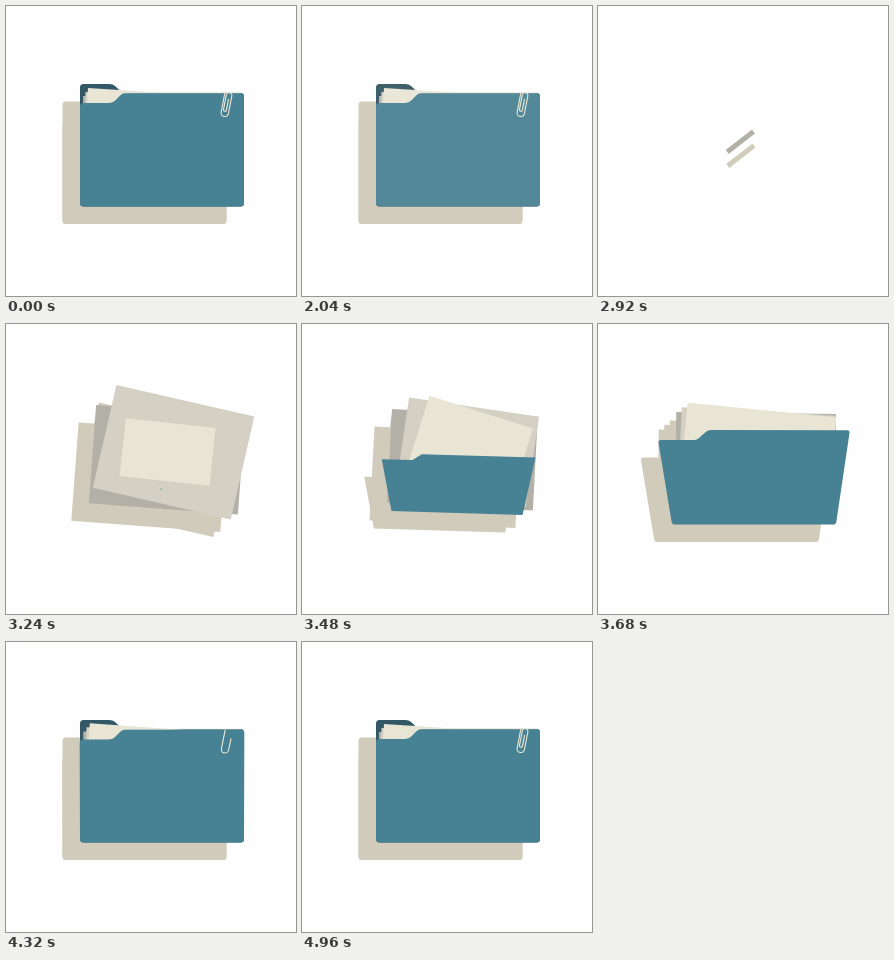
Animation of 290x290 px, one loop 5 s. Source, as an HTML page:

```html
<!DOCTYPE html>
<html lang="en">
<head>
<meta charset="utf-8">
<title>Folder</title>
<style>
  html, body { margin: 0; width: 100%; height: 100%; overflow: hidden; background: #fefefe; }
  svg { display: block; width: 100vw; height: 100vh; }
</style>
</head>
<body>
<svg viewBox="0 0 290 290">
  <g id="scene">
    <g id="shadows"></g>
    <g id="shapes"></g>
    <path id="edge" fill="none" stroke-width="0.9"/>
    <path id="clip" fill="none" stroke-width="1.15" stroke-linecap="round" pathLength="100"
      d="M-3.7 -10V9a3.7 3.7 0 0 0 7.4 0V-9a2.8 2.8 0 0 0 -5.6 0V6a1.5 1.5 0 0 0 3 0V-5"/>
  </g>
</svg>
<script>
const LOOP = 5000, STEP = 40;
const FADE = 1990, REBUILD = 2740, SPREAD = 3480, OPEN = 3720, CLOSE = 3960, SHUT = 4400;
const TEAL = [71, 129, 148], DARK = [50, 88, 101], CREAM = [232, 229, 212];
const MID = [212, 208, 196], GREY = [178, 176, 167], BEIGE = [208, 203, 186];
const PALE = [226, 228, 212], WHITE = [254, 254, 254];
const CENTER = 156, BASE = 200.6, HALF = 82, HEIGHT = 113.6;

const clamp = v => Math.max(0, Math.min(1, v));
const span = (t, a, b) => clamp((t - a) / (b - a));
const lerp = (a, b, k) => a + (b - a) * k;
const mix = (a, b, k) => a.map((v, i) => lerp(v, b[i], k));
const rgb = c => `rgb(${c.map(Math.round)})`;
const easeOut = k => 1 - (1 - k) ** 3;
const easeInOut = k => k < 0.5 ? 4 * k ** 3 : 1 - 4 * (1 - k) ** 3;

const place = (x, y, angle) => {
  const a = angle * Math.PI / 180, c = Math.cos(a), s = Math.sin(a);
  return ([u, v]) => [x + u * c - v * s, y + u * s + v * c];
};

function outline(points, radius) {
  const n = points.length;
  const toward = (p, q) => {
    const d = Math.hypot(q[0] - p[0], q[1] - p[1]) || 1;
    return mix(p, q, Math.min(radius / d, 0.5));
  };
  return points.map((p, i) =>
    `${i ? 'L' : 'M'}${toward(p, points[(i + n - 1) % n])}Q${p} ${toward(p, points[(i + 1) % n])}`
  ).join('') + 'Z';
}

// Pose of a sheet, given by its top left corner: [centre x, centre y, angle, width, height].
const pose = (x, y, angle, w, h) => [...place(x, y, angle)([w / 2, h / 2]), angle, w, h];
const fanned = i => pose(90 + 16 * i + i * i, 85 - 17 * i + 6 * i * i,
  3 + 4 * i + 1.25 * i * i, 146 - 10 * i - 5 * i * i, 94 - 3.5 * i * i);
const stacked = i => pose(78 + 5.5 * i, 88 - 4.5 * i, 0.7 + 2.3 * i, 160 - 5 * i, 100 - 2 * i);
const filed = i => pose(77 + 2.5 * i, 90 - 4 * i, 1.85 * i, 158 - 3 * i, 100);

// Sheets swing out of a thin strip, one after another, with a small overshoot.
const sheetStart = i => 2800 + 120 * i;
const growth = age => 1.08 * easeInOut(span(age, 0, 320)) - 0.08 * easeOut(span(age, 320, 680));

function sheet(i) {
  return t => {
    const size = growth(t - sheetStart(i));
    const spread = mix(fanned(i), stacked(i), easeInOut(span(t, SPREAD, OPEN)));
    const [cx, cy, angle, w, h] = mix(spread, filed(i), easeOut(span(t, CLOSE, LOOP - STEP)));
    const x = w * size / 2, y = h * size * size / 2;
    return [[-x, -y], [x, -y], [x, y], [-x, y]]
      .map(place(lerp(137, cx, size), cy, lerp(-50, angle, size)));
  };
}

// A cardboard side seen from its bottom middle; step is how far the left part lies below the right.
function panel(flare, step, sx = 1, sy = 1) {
  const top = HALF + 14 * flare, height = HEIGHT - 19 * flare;
  return [
    [-top, step - height], [-0.6 * top, step - height], [-0.48 * top, -height],
    [top, -height], [HALF, 0], [-HALF, 0]
  ].map(([x, y]) => [x * sx, y * sy]);
}

const flareAt = t => 1 - easeInOut(span(t, CLOSE, SHUT));

function front(t) {
  const grow = easeInOut(span(t, 3200, SPREAD)), settle = easeOut(span(t, SPREAD, OPEN));
  return panel(flareAt(t), 10, lerp(0.8 * grow, 1, settle), lerp(0.61 * grow, 1, settle))
    .map(place(lerp(155, CENTER, settle), lerp(165 + 24 * grow, BASE, settle),
      lerp(lerp(-10, 1.7, grow), 0, settle)));
}

function back(t) {
  const rise = easeInOut(span(t, CLOSE, 4320));
  return panel(0, -9, 1, lerp(0.66, 1, rise)).map(place(CENTER, BASE, 0));
}

const parts = [
  { color: DARK, fadeTo: BEIGE, radius: 3.5, from: 3840, points: back },
  ...[GREY, MID, CREAM].map((color, i) =>
    ({ color, fadeTo: WHITE, haste: 1.4, radius: 0, from: sheetStart(i), points: sheet(i) })),
  { color: TEAL, fadeTo: PALE, radius: 3.5, from: 3200, points: front }
];

const get = id => document.getElementById(id);
const scene = get('scene'), shadows = get('shadows'), shapes = get('shapes');
const edge = get('edge'), clip = get('clip');
const set = (el, attrs) => { for (const k in attrs) el.setAttribute(k, attrs[k]); };
const addPath = parent => parent.appendChild(document.createElementNS('http://www.w3.org/2000/svg', 'path'));
for (const part of parts) {
  part.shadow = addPath(shadows);
  part.shape = addPath(shapes);
}
set(clip, { stroke: rgb(CREAM) });

function render(time) {
  const fading = time < REBUILD;
  const t = fading ? LOOP : time;
  const fade = fading ? span(time, FADE, 2716) : 0;
  const drop = easeInOut(span(t, 2920, 3120));
  set(scene, { opacity: fading ? 1 - span(time, 2520, 2720) : 1 });
  set(shadows, {
    transform: `translate(${mix([0.5, 14], [-17.5, 17.5], drop)})`,
    fill: rgb(mix(BEIGE, [241, 237, 221], fade))
  });

  for (const { color, fadeTo, haste = 1, radius, from, points, shadow, shape } of parts) {
    const d = t > from ? outline(points(t), radius * span(t, SPREAD, OPEN)) : '';
    set(shadow, { d });
    set(shape, { d, fill: rgb(mix(color, fadeTo, clamp(fade * haste))) });
  }

  const [, , [tabX, tabY], [cornerX, cornerY]] = front(t);
  set(edge, {
    d: `M${tabX} ${tabY - 0.3}L${cornerX - 3} ${cornerY - 0.3}`,
    stroke: rgb(mix(CREAM, WHITE, fade)),
    opacity: span(t, 4200, SHUT)
  });
  const drawn = 100 * span(t, 3880, 4800);
  set(clip, {
    transform: `translate(${cornerX - 17.5} ${cornerY + 11}) rotate(${11 + 12 * flareAt(t)})`,
    'stroke-dasharray': `${drawn} 200`,
    visibility: drawn > 0 ? 'visible' : 'hidden'
  });
}

const start = performance.now();
function tick() {
  const time = (performance.now() - start) % LOOP;
  render(Math.floor(time / STEP) * STEP);
  requestAnimationFrame(tick);
}
tick();
</script>
</body>
</html>
```
